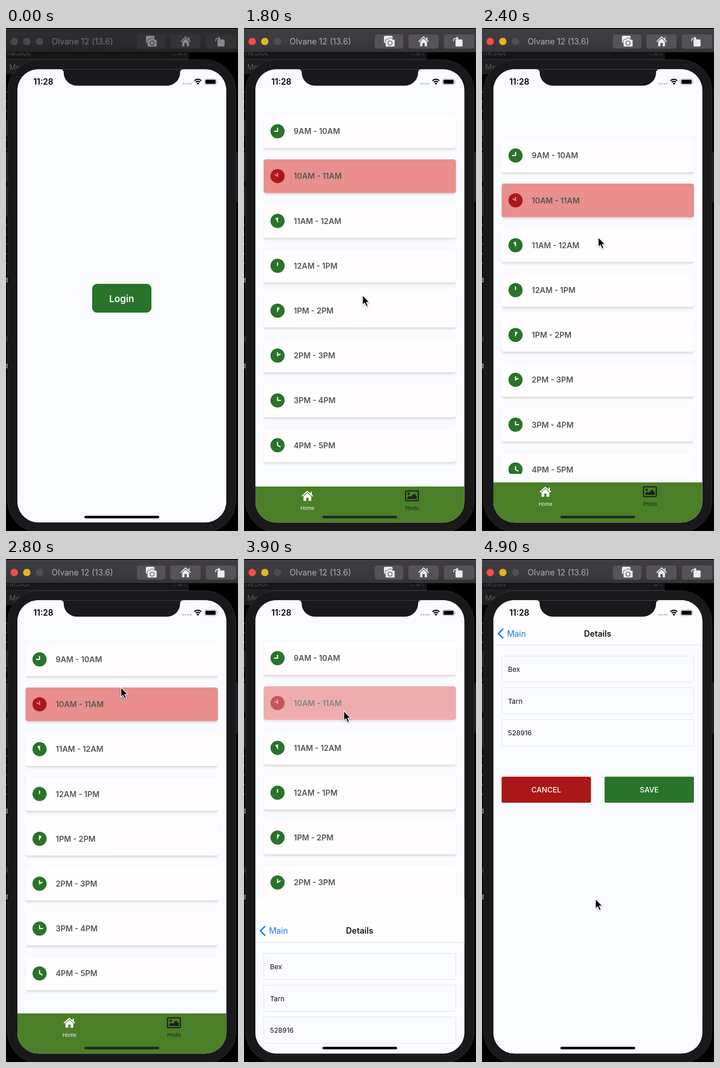
An HTML page for the animation above (5 s loop, 509x1101 px).

```html
<!DOCTYPE html>
<html lang="en">
<head>
<meta charset="utf-8">
<title>Login and details flow</title>
<style>
  html, body { margin: 0; width: 100%; height: 100%; overflow: hidden; background: #000; }
  svg { display: block; width: 509px; height: 1101px; }
  text { font-family: Inter, "Liberation Sans", sans-serif; }
  .mid { text-anchor: middle; }
  .semi { font-weight: 600; }
  .card { filter: drop-shadow(0 3px 2.5px rgba(100, 90, 50, .23)); }
  #cursor { filter: drop-shadow(0 1px 1.5px rgba(0, 0, 0, .35)); }
  #bar { --bar: #262528; --btn: #333235; --icon: #89888b; --title: #737275; --r: #4a494c; --y: #4a494c; --g: #4a494c; }
  #bar.on { --bar: #38363a; --btn: #555357; --icon: #ecebed; --title: #aeadb0; --r: #fd4b47; --y: #dfb621; --g: #504e52; }
  .btn { fill: var(--btn); }
  .icon { fill: var(--icon); }
</style>
</head>
<body>
<svg viewBox="0 0 509 1101" xmlns="http://www.w3.org/2000/svg">
  <defs>
    <clipPath id="screen"><rect x="25" y="90.300" width="458.300" height="992" rx="46"/></clipPath>
    <clipPath id="list"><rect x="42.500" y="150" width="423" height="826"/></clipPath>
    <clipPath id="strip"><rect y="54" width="401" height="15"/></clipPath>
    <linearGradient id="sheen" x2="0" y2="1">
      <stop stop-color="#fff" stop-opacity=".03"/>
      <stop offset="1" stop-opacity=".08"/>
    </linearGradient>
  </defs>

  <rect width="509" height="1101"/>
  <g id="behind">
    <g clip-path="url(#strip)">
      <rect y="54" width="401" height="15" fill="#171618"/>
      <text x="-3" y="60" font-size="17" fill="#4d4c4f">meSlot</text>
      <text x="359" y="60" font-size="15" fill="#39383b">⌥⌘1</text>
    </g>
    <path d="M0 68.500H401" stroke="#343336"/>
    <rect y="69" width="401" height="32" fill="#1e1d20"/>
    <text x="7" y="91" font-size="16" fill="#5a595c">Me</text>
    <path d="M0 201h5v36h-5zM0 272h5v64h-5zM0 347h5v66h-5z" fill="#222124"/>
    <text x="-5" y="557" font-size="15" fill="#b8b8b8">d</text>
    <text x="-5" y="684" font-size="15" fill="#1c5a1b">g</text>
    <text x="-5" y="745" font-size="15" fill="#b8b8b8">d</text>
    <rect x="502" y="271" width="7" height="110" rx="2" fill="#1d1c20"/>
  </g>

  <g id="bar">
    <rect y="2" width="509" height="51" style="fill:var(--bar)"/>
    <rect y="2" width="509" height="51" fill="url(#sheen)"/>
    <path d="M0 2.500H509" stroke="#fff" stroke-opacity=".12"/>
    <circle cx="18" cy="29.500" r="8.100" style="fill:var(--r)"/>
    <circle cx="45.700" cy="29.500" r="8.100" style="fill:var(--y)"/>
    <circle cx="73.500" cy="29.500" r="8.100" style="fill:var(--g)"/>
    <text x="100" y="36" font-size="18" style="fill:var(--title)">Olvane 12 (13.6)</text>
    <rect class="btn" x="287" y="14" width="62.500" height="31" rx="5"/>
    <rect class="btn" x="360.500" y="14" width="66.500" height="31" rx="5"/>
    <rect class="btn" x="438.500" y="14" width="66.500" height="31" rx="5"/>
    <rect class="icon" x="307" y="17" width="19" height="16" rx="3"/>
    <path class="icon" d="M313 25h3l2-3h6l2 3h3q2 0 2 2v12q0 2-2 2h-17q-2 0-2-2V27q0-2 2-2z" style="stroke:var(--btn)"/>
    <circle cx="320.500" cy="33" r="4.500" fill="none" stroke-width="1.600" style="stroke:var(--btn)"/>
    <path d="M383 30L394 19.500L405 30M401.500 20v6" fill="none" stroke-width="2" style="stroke:var(--icon)"/>
    <path class="icon" d="M386.500 30L394 23l7.500 7v10h-5v-7h-5v7h-5z"/>
    <rect class="icon" x="464" y="25" width="15.500" height="15.500" rx="2"/>
    <path d="M460 29v-2q0-4 4-4h3" fill="none" stroke-width="1.800" style="stroke:var(--icon)"/>
    <path class="icon" d="M466 18.500l5 4.500l-5 4.500z"/>
  </g>

  <rect x="3.500" y="69.500" width="501" height="1034" rx="69" fill="#19181b" stroke="#302f32"/>

  <g clip-path="url(#screen)">
    <rect x="25" y="90" width="459" height="993" fill="#fafbff"/>
    <g id="login">
      <rect x="189" y="560" width="130" height="63" rx="11" fill="#29732b"/>
      <text class="mid semi" x="253.700" y="600" font-size="20.500" fill="#fff">Login</text>
    </g>
    <g id="main">
      <rect x="25" y="90" width="459" height="993" fill="#fafbff"/>
      <g clip-path="url(#list)"><g id="rows"></g></g>
      <rect x="25" y="994.600" width="459" height="88" fill="#4a7f27"/>
      <path d="M127 1016L139 1005.500L151 1016M147.500 1006v6" fill="none" stroke="#fff" stroke-width="2.400"/>
      <path d="M130.500 1016.500L139 1009l8.500 7.500v9.500h-6v-7h-5v7h-6z" fill="#fff"/>
      <text class="mid" x="139.300" y="1046" font-size="11" fill="#f0f5ec">Home</text>
      <rect x="354.300" y="1004.300" width="28" height="21.500" rx="2" fill="none" stroke="#1c211a" stroke-width="2.600"/>
      <circle cx="361" cy="1010.500" r="2.600" fill="#1c211a"/>
      <path d="M358 1022v-3l4.500-4.500 3 3 7.500-7.500 6 6v6z" fill="#1c211a"/>
      <text class="mid" x="368.500" y="1046" font-size="11" fill="#1c211a">Photo</text>
    </g>
    <g id="details">
      <rect x="25" y="90" width="459" height="993" fill="#fafbff"/>
      <rect x="25" y="90" width="459" height="98" fill="#fffeff"/>
      <path d="M25 188H484" stroke="#dcdce0"/>
      <path d="M46.500 152.500L36 163l10.500 10.500" fill="none" stroke="#1578ee" stroke-width="3"/>
      <text x="55" y="169.500" font-size="18" fill="#1578ee">Main</text>
      <text class="mid semi" x="253.700" y="169.500" font-size="18" fill="#141416">Details</text>
      <g id="fields"></g>
      <rect x="43" y="476.500" width="196" height="57" rx="3" fill="#ab1718"/>
      <rect x="269" y="476.500" width="196" height="57" rx="3" fill="#29732b"/>
      <g class="mid" font-size="16" font-weight="500" fill="#fff">
        <text x="141" y="511">CANCEL</text>
        <text x="367" y="511">SAVE</text>
      </g>
    </g>
    <path d="M119.500 89v1.300a7 7 0 0 1 7 7a29 29 0 0 0 29 29H353a29 29 0 0 0 29-29a7 7 0 0 1 7-7v-1.300z" fill="#19181b"/>
    <text class="semi" x="60" y="124" font-size="18">11:28</text>
    <g fill="#bfc1c6">
      <circle cx="389" cy="122" r="2"/><circle cx="394.500" cy="122" r="2"/>
      <circle cx="400" cy="122" r="2"/><circle cx="405.300" cy="122" r="2"/>
    </g>
    <path d="M413.500 115.500a10.500 10.500 0 0 1 15 0M416.300 118.700a6.600 6.600 0 0 1 9.400 0" fill="none" stroke="#000" stroke-width="2.500"/>
    <path d="M421 124.200l-2.800-3a4 4 0 0 1 5.600 0z"/>
    <rect x="435.500" y="111.500" width="26.500" height="12.500" rx="3.800" fill="none" stroke="#999ba0"/>
    <rect x="437.500" y="113.300" width="22.500" height="8.900" rx="2"/>
    <path d="M463.500 115.500q2 2.200 0 4.500z" fill="#999ba0"/>
    <rect id="grip" x="172" y="1067.700" width="164" height="5.600" rx="2.800"/>
  </g>

  <path id="cursor" d="M0 0V21.500L4.800 17L8.300 25L12 23.400L8.600 15.600H15.200z" stroke="#fff" stroke-width="1.500"/>
</svg>
<script>
const LOOP = 5000, STEP = 100, PITCH = 98.2, HEIGHT = 992;
const CARD_OMEGA = Math.sqrt(1000 / 3), BOUNCE_OMEGA = 10.6;
const $ = id => document.getElementById(id);

// [time, x, y]
const cursorPath = [
  [200, 60, 908], [600, 170, 840], [900, 230, 690], [1200, 260, 580],
  [1700, 260, 581], [2000, 260, 592], [2200, 261, 794], [2300, 261, 794],
  [2400, 255, 458], [2800, 252, 281], [3100, 246, 260], [3300, 230, 243],
  [3600, 219, 327], [4300, 219, 340], [4900, 249, 744]
];
const pull = [[2000, 0], [2200, 87]];
const rowFade = [[3700, 1], [3800, .62], [3900, .72], [4100, 1]];

function track(keys, t) {
  if (t <= keys[0][0]) return keys[0].slice(1);
  for (let i = 1; i < keys.length; i++) {
    const [a, ...from] = keys[i - 1], [b, ...to] = keys[i];
    if (t <= b) return from.map((v, n) => v + (to[n] - v) * (t - a) / (b - a));
  }
  return keys[keys.length - 1].slice(1);
}

// Remaining fraction of a critically damped spring
function spring(ms, omega) {
  const x = Math.max(0, ms) / 1000 * omega;
  return (1 + x) * Math.exp(-x);
}

function makeRow(i) {
  const start = 9 + i, busy = i === 1;
  const label = h => (h > 12 ? h - 12 : h) + (h > 12 ? 'PM' : 'AM');
  const angle = start * Math.PI / 6;
  const hx = 7.5 * Math.sin(angle), hy = -7.5 * Math.cos(angle);
  return `<g id="row${i}" transform="translate(0 ${217 + i * PITCH})">
    <rect class="card" x="43" y="-36.700" width="422" height="73.500" rx="5" fill="${busy ? '#e98f8d' : '#fffdfe'}"/>
    <circle cx="73.600" r="15.500" fill="${busy ? '#ac1819' : '#29732b'}"/>
    <path d="M73.600 -7.500V0l${hx} ${hy}" fill="none" stroke="${busy ? '#e98f8d' : '#fff'}" stroke-width="2.400"/>
    <text class="semi" x="109" y="6.300" font-size="17" fill="#555">${label(start)} - ${label(start + 1)}</text>
  </g>`;
}

$('rows').innerHTML = Array.from({ length: 8 }, (_, i) => makeRow(i)).join('');
$('fields').innerHTML = ['Bex', 'Tarn', '528916'].map((value, i) => {
  const y = 212.3 + i * 69.7;
  return `<rect x="43.500" y="${y}" width="421" height="57.500" rx="3.500" fill="none" stroke="#dedfe3"/>
    <text x="57" y="${y + 34.6}" font-size="15" fill="#111">${value}</text>`;
}).join('');
$('behind').insertAdjacentHTML('beforeend',
  [141, 161, 182, 244, 265, 431, 452, 473, 494, 515]
    .map(y => `<circle cx="0.500" cy="${y}" r="1.400" fill="#1f8a28"/>`).join(''));

const move = (id, x, y) => $(id).setAttribute('transform', `translate(${x} ${y})`);
const show = (id, on) => $(id).setAttribute('visibility', on ? 'visible' : 'hidden');

function draw(t) {
  const mainLeft = spring(t - 1430, CARD_OMEGA), detailsLeft = spring(t - 3833.3, CARD_OMEGA);
  $('bar').classList.toggle('on', t >= 300);
  show('cursor', t >= 200);
  move('cursor', ...track(cursorPath, t));
  show('main', mainLeft < 1);
  move('main', 0, HEIGHT * mainLeft);
  show('details', detailsLeft < 1);
  move('details', 0, HEIGHT * detailsLeft);
  move('rows', 0, track(pull, t)[0] * spring(t - 2300, BOUNCE_OMEGA));
  $('row1').setAttribute('opacity', track(rowFade, t)[0]);
  $('grip').setAttribute('fill', mainLeft < .1 && detailsLeft === 1 ? '#20271c' : '#000');
}

const begin = performance.now();
function tick(now) {
  const t = Math.max(0, now - begin) % LOOP;
  draw(Math.floor(t / STEP) * STEP);
  requestAnimationFrame(tick);
}
draw(0);
requestAnimationFrame(tick);
</script>
</body>
</html>
```
